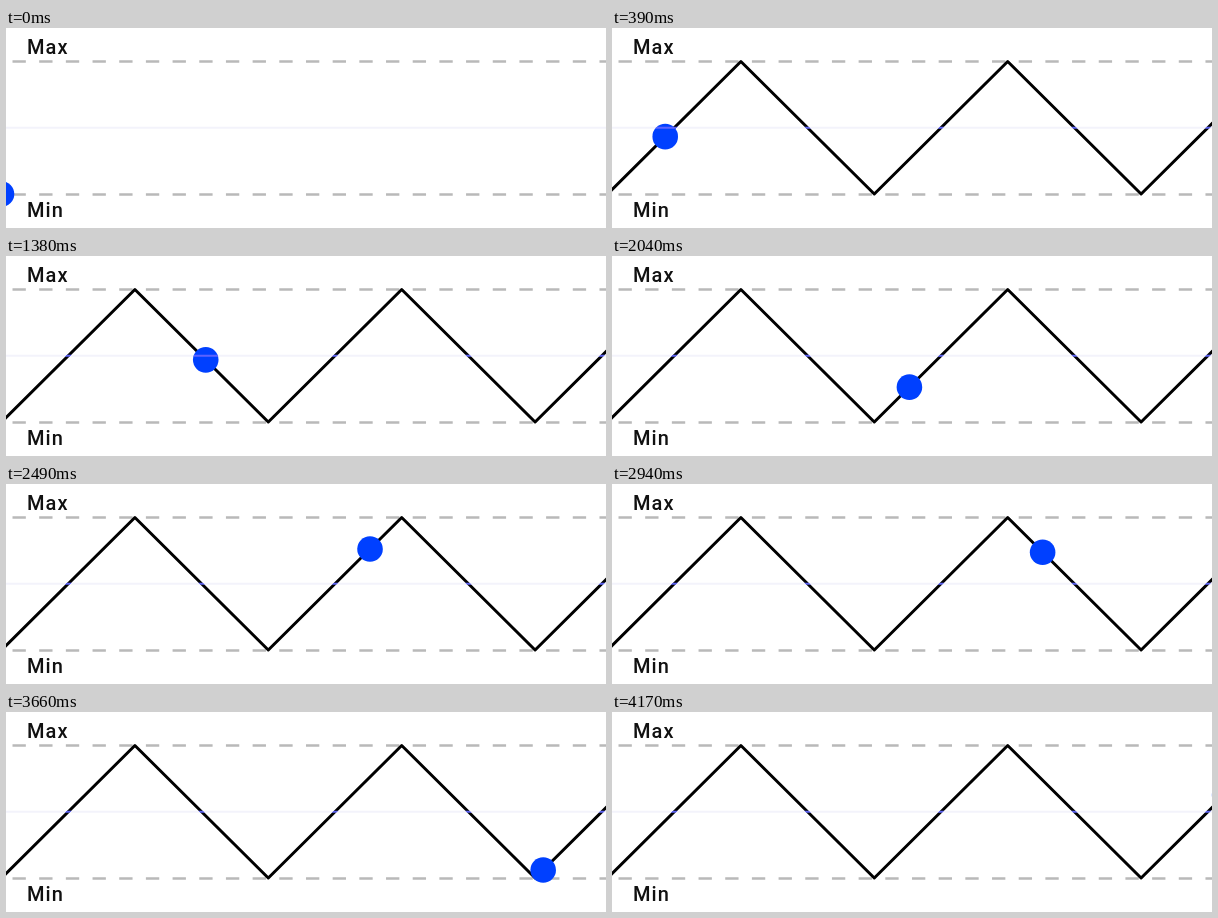
An HTML page with a canvas for the animation above (4.6 s loop, 600 by 200 pixels).

```html
<!DOCTYPE html>
<html lang="en">
<head>
<meta charset="utf-8">
<title>Triangle wave</title>
<style>
  html, body { margin: 0; width: 100%; height: 100%; overflow: hidden; background: #fff; }
  canvas { display: block; }
</style>
</head>
<body>
<canvas id="stage" width="600" height="200"></canvas>
<script>
const ctx = document.getElementById('stage').getContext('2d');
const LOOP = 4600, STEP = 30;
const TOP = 33.5, BOTTOM = 166, START = -4.5, HALF = 133.4;
const SPEED = 0.148, RADIUS = 12.8;

// Height of the triangle wave at x
function waveY(x) {
  const phase = (((x - START) / HALF) % 2 + 2) % 2;
  return BOTTOM - (BOTTOM - TOP) * (1 - Math.abs(1 - phase));
}

function hline(y, color, width, dash = []) {
  ctx.strokeStyle = color;
  ctx.lineWidth = width;
  ctx.setLineDash(dash);
  ctx.beginPath();
  ctx.moveTo(dash.length ? 6.5 - HALF / 5 : 0, y);
  ctx.lineTo(600, y);
  ctx.stroke();
  ctx.setLineDash([]);
}

function drawWave() {
  ctx.strokeStyle = '#000';
  ctx.lineWidth = 3;
  ctx.lineJoin = 'round';
  ctx.beginPath();
  for (let i = 0; i < 6; i++) ctx.lineTo(START + i * HALF, i % 2 ? TOP : BOTTOM);
  ctx.stroke();
}

function draw(time) {
  const t = Math.floor((time % LOOP) / STEP) * STEP;
  ctx.fillStyle = '#fff';
  ctx.fillRect(0, 0, 600, 200);

  for (const y of [TOP, BOTTOM + 0.5]) hline(y, '#b9b9b9', 2.6, [HALF / 10, HALF / 10]);
  hline(99.7, '#f3f3fb', 2);

  ctx.fillStyle = '#111';
  ctx.font = '500 20px Roboto, sans-serif';
  ctx.letterSpacing = '1.1px';
  ctx.fillText('Max', 21, 26);
  ctx.fillText('Min', 21, 188.5);

  if (t > 0) drawWave();

  const x = START + SPEED * t;
  ctx.fillStyle = '#0040ff';
  ctx.beginPath();
  ctx.arc(x, waveY(x), RADIUS, 0, 2 * Math.PI);
  ctx.fill();

  // The midline tints whatever dark shape crosses it
  ctx.globalCompositeOperation = 'lighten';
  hline(99.7, '#5c62f0', 2);
  ctx.globalCompositeOperation = 'source-over';
}

const begin = performance.now();
function tick() {
  draw(performance.now() - begin);
  requestAnimationFrame(tick);
}
tick();
</script>
</body>
</html>
```
